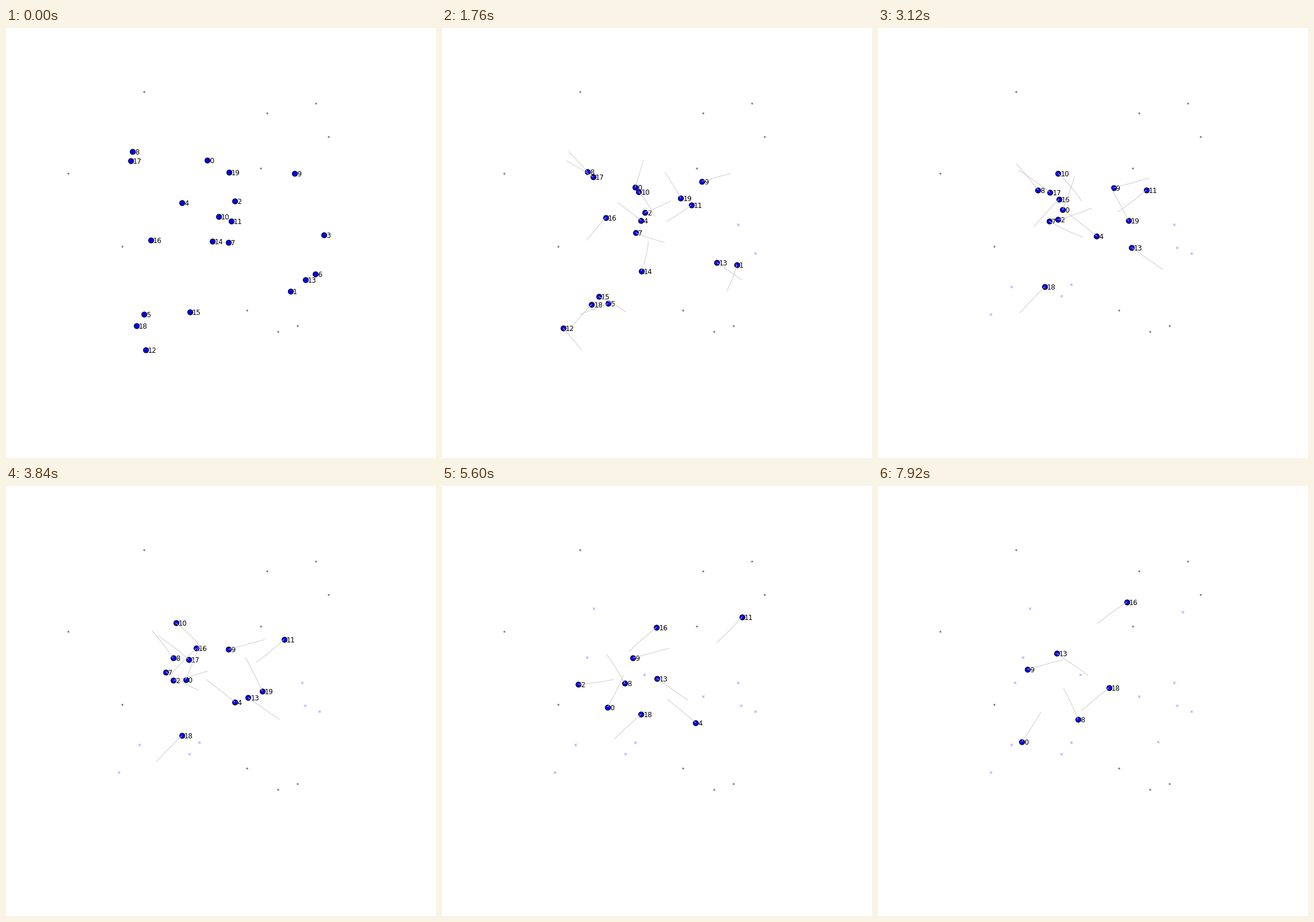
A matplotlib script that plays this animation: 748 by 748 pixels, repeating every 8 s.

```python
import matplotlib.pyplot as plt
import numpy as np
from matplotlib.animation import FuncAnimation

SIZE, DPI = 748, 64
PX = 72 / DPI
FRAMES, INTERVAL = 100, 80
TRAIL = 25
GAP = [[np.nan, np.nan]]


def travelled(n):
    """Distance in full-speed frames: a short start-up, then steady speed."""
    return n - 2 * (1 - np.exp(-n / 2))


class Walker:
    """Follows a bowed line and leaves a cross if its life ends before the loop."""

    def __init__(self, start, end, bow=0, life=FRAMES - 1):
        start, step = np.array(start), np.subtract(end, start)
        side = np.array([-step[1], step[0]]) / np.hypot(*step)
        u = (travelled(np.arange(life + 1)) / travelled(life))[:, None]
        self.pos = start + u * step + 4 * u * (1 - u) * bow * side
        self.end = life if life < FRAMES - 1 else FRAMES


walkers = [
    Walker((350, 230), (250, 445), bow=-11),
    Walker((495, 458), (517, 385), bow=4, life=33),
    Walker((398, 301), (235, 345), bow=-9, life=71),
    Walker((553, 360), (512, 345), bow=3, life=19),
    Walker((306, 304), (484, 448), bow=-2, life=92),
    Walker((240, 498), (316, 469), life=33),
    Walker((538, 428), (542, 395), bow=4, life=16),
    Walker((387, 373), (249, 301), bow=-9, life=62),
    Walker((220, 215), (348, 406), bow=-12),
    Walker((502, 253), (260, 319)),
    Walker((370, 328), (261, 216), bow=12, life=64),
    Walker((392, 336), (527, 222), bow=7, life=73),
    Walker((243, 560), (193, 501), life=33),
    Walker((521, 438), (311, 291)),
    Walker((359, 371), (333, 449), bow=-5, life=33),
    Walker((320, 494), (229, 453), bow=5, life=39),
    Walker((252, 369), (433, 202), bow=-10),
    Walker((217, 231), (349, 331), bow=-6, life=64),
    Walker((227, 518), (402, 351), bow=-6),
    Walker((388, 251), (451, 369), bow=-3, life=53),
]

SPECKS = np.array([(240, 110), (539, 130), (454, 147), (561, 188), (443, 243),
                   (108, 252), (202, 379), (419, 490), (507, 517), (473, 527)])

fig = plt.figure(figsize=(SIZE / DPI, SIZE / DPI), dpi=DPI, facecolor="white")
ax = fig.add_axes([0, 0, 1, 1])
ax.set_xlim(0, SIZE)
ax.set_ylim(SIZE, 0)
ax.axis("off")


def layer(style, z, **kw):
    return ax.plot([], [], style, zorder=z, **kw)[0]


def place(line, points):
    pts = np.vstack(points) if points else np.empty((0, 2))
    line.set_data(pts[:, 0], pts[:, 1])


ax.plot(*(SPECKS + 0.5).T, "D", color="#808080", ms=3 * PX, mew=0, zorder=1)
crosses = layer("x", 2, color="#a0a0ff", ms=4 * PX, mew=PX)
dots = layer("o", 3, mfc="#0000ff", mec="black", ms=9 * PX, mew=1.2 * PX)
trails = layer("-", 5, color="#c8c8c8", lw=0.9 * PX)
labels = [ax.text(0, 0, str(i), family="DejaVu Sans", size=12 * PX, color="black",
                  ha="left", va="baseline", zorder=4) for i in range(len(walkers))]


def draw(n):
    heads, tails, marks = [], [], []
    for walker, label in zip(walkers, labels):
        alive = n < walker.end
        label.set_visible(alive)
        if not alive:
            marks.append(walker.pos[-1] + (3, -3))
            continue
        x, y = walker.pos[n]
        heads.append((x, y))
        tails += [walker.pos[max(0, n - TRAIL):n + 1], GAP]
        label.set_position((x + 4, y + 5))
    place(dots, heads)
    place(trails, tails)
    place(crosses, marks)
    return [crosses, dots, trails, *labels]


anim = FuncAnimation(fig, draw, frames=FRAMES, interval=INTERVAL,
                     init_func=lambda: draw(0), repeat=True, repeat_delay=0)
plt.show()
```
